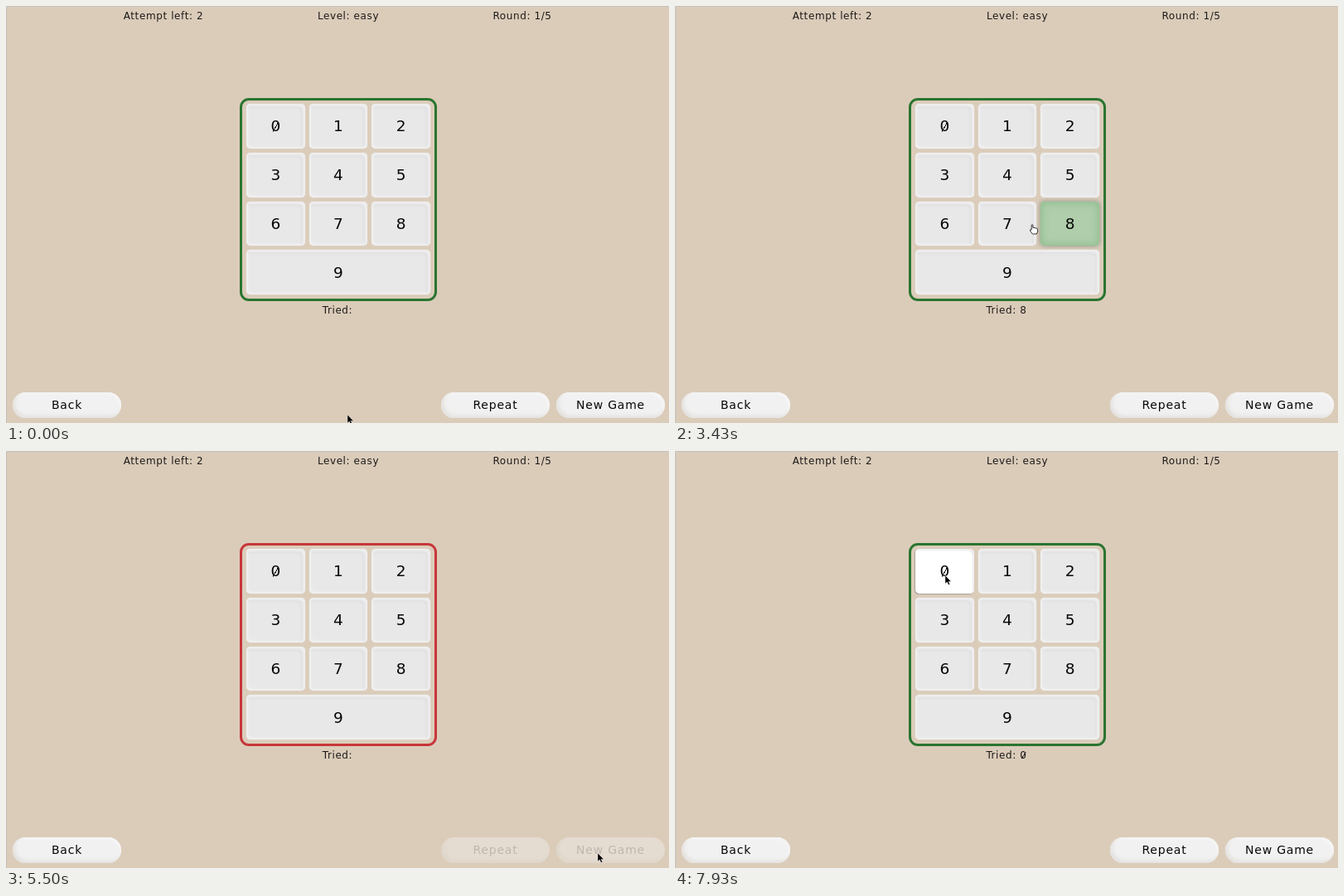
Write an HTML page that moves like this. It is 800 px wide and 503 px high and loops after 8000 ms.

```html
<!DOCTYPE html>
<html lang="en">
<head>
<meta charset="utf-8">
<title>Number memory game</title>
<style>
  html, body { margin: 0; width: 100%; height: 100%; overflow: hidden; }
  body { background: #dbccba; }
  #stage {
    position: relative; width: 800px; height: 503px; overflow: hidden;
    font: 12px "DejaVu Sans", sans-serif; letter-spacing: .6px; color: #1c1a18;
    box-shadow: inset 1px 1px #c4c0ba;
  }
  #stage > * { position: absolute; box-sizing: border-box; }
  .label { width: 200px; line-height: 25px; text-align: center; white-space: nowrap; }

  #board {
    left: 282px; top: 111px; width: 238px; height: 245px;
    border: 3px solid #2a7530; border-radius: 11px;
    padding: 4px 5px 5px; display: grid; gap: 5px;
    grid-template: repeat(4, 1fr) / repeat(3, 1fr);
  }
  .key {
    position: relative; isolation: isolate; border-radius: 5px;
    display: grid; place-items: center; font-size: 18.5px; letter-spacing: 0; color: #080808;
    background: #e8e8e8;
    box-shadow: inset 2px -2px 3px #f1f1f1, inset -3px 3px 2px #eeeeee,
                inset -5px 5px 3px #dfdfe2, 0 0 2px #e6ddd2;
  }
  .key:last-child { grid-column: 1 / 4; }
  .key::before {
    content: ""; position: absolute; inset: 0; z-index: -1; border-radius: 5px;
    opacity: var(--glow, 0); background: #b0cdac;
    box-shadow: inset 0 0 9px 2px #8fc08f, 0 0 5px 1px #9a9c90;
  }
  .key.pressed { background: #fff; box-shadow: inset -4px 4px 2px -2px #ececec, -1px 1px 1px #a9a39a; }
  .zero {
    display: inline-block; line-height: .73em;
    background: linear-gradient(to bottom right, transparent 46%, currentColor 46% 54%, transparent 54%)
                center / 62% 90% no-repeat;
  }

  #banner {
    left: 0; top: 41px; width: 800px; height: 402px; padding-top: 7px;
    background: rgba(250, 254, 252, .72); box-shadow: 0 0 13px #000;
    clip-path: inset(-20px 0);
    font-size: 93px; line-height: 396px; letter-spacing: 8px; text-indent: 8px; text-align: center;
    white-space: nowrap; color: #2f7628; -webkit-text-stroke: 1px #2f7628;
  }
  .button {
    top: 466px; width: 131px; height: 31px; border-radius: 16px;
    line-height: 31px; text-align: center; font-size: 14px; letter-spacing: .8px; color: #080808;
    background: #f1f1f1; box-shadow: inset 3px -3px 4px #e4e2df, inset -2px 2px 3px #f6f6f6;
  }
  .button.disabled {
    background: rgba(242, 242, 242, .4); color: rgba(0, 0, 0, .17);
    box-shadow: inset 3px -3px 4px rgba(215, 205, 192, .4);
  }
  #cursor { left: 0; top: 0; overflow: visible; }
</style>
</head>
<body>
<div id="stage">
  <div class="label" style="left:90px">Attempt left: 2</div>
  <div class="label" style="left:313px">Level: easy</div>
  <div class="label" style="left:523px">Round: 1/5</div>
  <div id="board"></div>
  <div class="label" id="tried" style="left:300px;top:355px"></div>
  <div id="banner">Round Won!</div>
  <div class="button" style="left:8px">Back</div>
  <div class="button" id="repeat" style="left:525px">Repeat</div>
  <div class="button" id="newGame" style="left:664px">New Game</div>
  <svg id="cursor" width="14" height="16">
    <path id="arrow" d="M0 0V10L2.3 8 4 11.6 5.7 10.8 4.1 7.4H7.2Z" fill="#000" stroke="#fff" stroke-width=".4"/>
    <path id="hand" d="M2.2 7V1.2Q3 .2 3.9 1.2V4.5Q5 3.7 6 4.7 7 4.2 7.8 5.2 9.6 4.8 9.6 6.5V9L8.4 12H3.4L.4 8Q0 6.2 2.2 7Z"
      fill="#fff" stroke="#222" stroke-width=".9"/>
  </svg>
</div>
<script>
const LOOP = 8000;
const $ = id => document.getElementById(id);
const clamp = v => Math.max(0, Math.min(1, v));
const during = (t, ranges) => ranges.some(([start, end]) => t >= start && t < end);
const digit = d => d === '0' ? '<span class="zero">0</span>' : d;

// Showing the sequence, then waiting for the player
const watching = [[700, 2400], [5200, 7150]];
const won = [4070, 5200];
const handTimes = [[480, 700], [2650, won[0]], [5000, 5200], [7450, 7860]];
const hidden = [[1050, 1560]];

// [key, start, end]
const glows = [
  [8, 1250, 1660], [6, 1850, 2260], [8, 3160, 3660], [6, 4060, 4560],
  [4, 5780, 6240], [7, 6520, 6940]
];
const presses = [[8, 3070, 3180], [6, 3930, 4060], [0, 7860, LOOP]];

// [time, digits entered so far]
const entries = [[0, ''], [3120, '8'], [3960, '86'], [5200, ''], [7860, '0']];

// [time, x, y]
const pointerPath = [
  [0, 412, 493], [60, 412, 493], [550, 712, 484], [820, 712, 485], [1050, 735, 515],
  [1560, 560, 515], [2250, 500, 330], [2850, 476, 268], [3200, 474, 268], [3430, 428, 263],
  [3850, 336, 260], [4250, 336, 260], [5050, 714, 485], [5720, 714, 485], [6200, 302, 390],
  [6310, 315, 379], [6500, 315, 379], [7650, 326, 150], [LOOP, 326, 150]
];

const keys = [...'0123456789'].map(d => {
  const key = document.createElement('div');
  key.className = 'key';
  key.innerHTML = digit(d);
  return $('board').appendChild(key);
});

function pointerAt(t) {
  const next = pointerPath.findIndex(point => point[0] > t);
  const [t0, x0, y0] = pointerPath[next - 1];
  const [t1, x1, y1] = pointerPath[next];
  const u = (t - t0) / (t1 - t0);
  const eased = u * u * (3 - 2 * u);
  return [x0 + (x1 - x0) * eased, y0 + (y1 - y0) * eased];
}

function glowAt(key, t) {
  return Math.max(0, ...glows
    .filter(glow => glow[0] === key)
    .map(([, start, end]) => Math.min(clamp((t - start) / 100), clamp((end - t) / 120))));
}

let shownEntry;
function showEntry(t) {
  const entry = entries.filter(e => e[0] <= t).pop()[1];
  if (entry === shownEntry) return;
  shownEntry = entry;
  $('tried').innerHTML = ['Tried:', ...[...entry].map(digit)].join(' ');
}

function draw(t) {
  const busy = during(t, watching);
  const finished = during(t, [won]);

  $('board').style.borderColor = busy || finished ? '#c73639' : '#2a7530';
  $('banner').style.display = finished ? 'block' : 'none';
  $('repeat').textContent = finished ? 'Next' : 'Repeat';
  for (const id of ['repeat', 'newGame']) $(id).classList.toggle('disabled', busy);
  showEntry(t);

  keys.forEach((key, i) => {
    key.style.setProperty('--glow', glowAt(i, t));
    key.classList.toggle('pressed', presses.some(([k, start, end]) => k === i && t >= start && t < end));
  });

  const [x, y] = pointerAt(t);
  const hand = during(t, handTimes);
  $('cursor').style.transform = `translate(${x}px, ${y}px)`;
  $('cursor').style.visibility = during(t, hidden) ? 'hidden' : 'visible';
  $('arrow').style.display = hand ? 'none' : '';
  $('hand').style.display = hand ? '' : 'none';
}

const startTime = performance.now();
function tick() {
  draw((performance.now() - startTime) % LOOP);
  requestAnimationFrame(tick);
}
tick();
</script>
</body>
</html>
```
